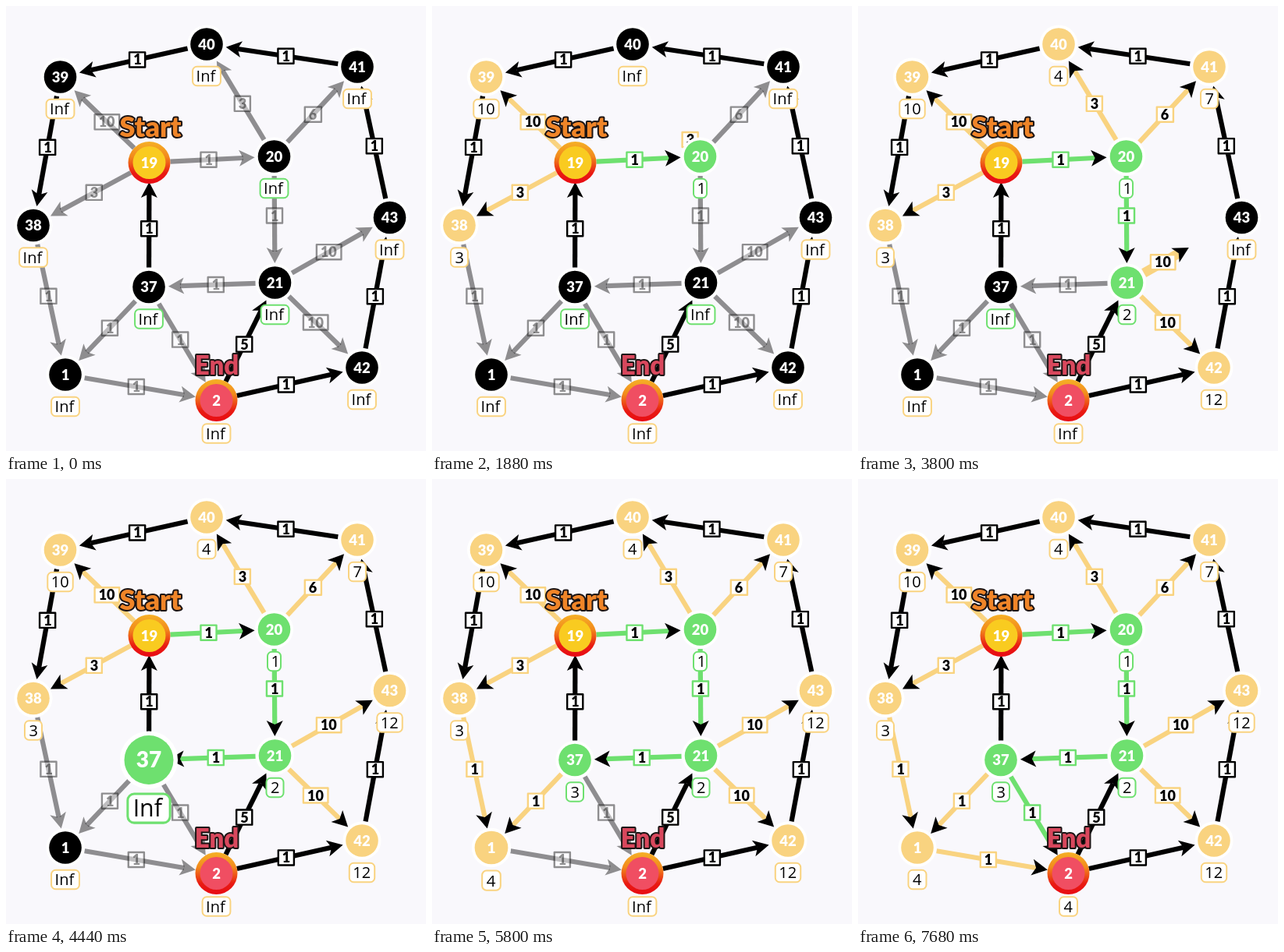
Write an HTML page with a canvas that moves like this. It is 538 by 571 pixels and loops after 7.72 s.

```html
<!DOCTYPE html>
<html lang="en">
<head>
<meta charset="utf-8">
<title>Shortest path</title>
<style>
html, body { margin: 0; width: 100%; height: 100%; overflow: hidden; background: #f9f8fc; }
canvas { display: block; width: 538px; height: 571px; }
</style>
</head>
<body>
<canvas id="stage"></canvas>
<script>
const LOOP = 7720;
const STEP = 420, PAUSE = 195, BEGIN = 225;       // time per edge, wait per visited node, lead-in
const GROW = 215, PEAK = 325, SETTLE = 410;       // phases inside one step
const YELLOW = '#f9d380', GREEN = '#6ee06f', INK = '#000';
const BOLD = 'Lato, "Open Sans", sans-serif', PLAIN = '"Open Sans", "Noto Sans", sans-serif';

const nodes = {
  40: [257, 49], 41: [450, 78], 39: [69.5, 91], 20: [343.5, 193], 19: [183.5, 201], 38: [35, 281.5],
  43: [491.5, 271.5], 37: [183, 360.5], 21: [344.5, 355], 1: [76, 473], 42: [456, 464], 2: [269.5, 506]
};
const path = ['20', '21', '37'];
const fixed = [[40, 39, 1], [41, 40, 1], [43, 41, 1], [39, 38, 1], [37, 19, 1], [2, 21, 5], [2, 42, 1], [42, 43, 1]];

// from, to, weight, resulting distance, on the shortest path
const steps = [
  [19, 38, 3, 3], [19, 39, 10, 10], [19, 20, 1, 1, true],
  [20, 40, 3, 4], [20, 41, 6, 7], [20, 21, 1, 2, true],
  [21, 42, 10, 12], [21, 43, 10, 12], [21, 37, 1, 3, true],
  [38, 1, 1, 4],
  [37, 1, 1, 4], [37, 2, 1, 4, true],
  [1, 2, 1, 4]
];
let clock = BEGIN, last = 0;
const starts = steps.map(([from]) => {
  if (from !== last) clock += PAUSE;
  last = from;
  clock += STEP;
  return clock - STEP;
});

const canvas = document.getElementById('stage');
const ctx = canvas.getContext('2d');
const ratio = window.devicePixelRatio || 1;
canvas.width = 538 * ratio;
canvas.height = 571 * ratio;

const wave = u => (1 - Math.cos(Math.PI * u)) / 2;

function pulse(t) {
  if (t <= GROW || t >= SETTLE) return 1;
  return 1 + (t < PEAK ? wave((t - GROW) / (PEAK - GROW)) : wave((SETTLE - t) / (SETTLE - PEAK)));
}

function disc(r, fill) {
  ctx.beginPath();
  ctx.arc(0, 0, r, 0, 7);
  ctx.fillStyle = fill;
  ctx.fill();
}

// Boxed text, fitted to and centred on the ink of its glyphs
function tag(x, y, text, o) {
  ctx.font = o.font;
  ctx.textAlign = 'left';
  const m = ctx.measureText(text);
  const l = m.actualBoundingBoxLeft, ink = l + m.actualBoundingBoxRight;
  const w = ink + o.pad - o.line, h = o.height - o.line;
  ctx.beginPath();
  ctx.roundRect(x - w / 2, y - h / 2, w, h, o.radius);
  ctx.fillStyle = '#fff';
  ctx.fill();
  ctx.strokeStyle = o.color;
  ctx.lineWidth = o.line;
  ctx.stroke();
  ctx.fillStyle = INK;
  ctx.fillText(text, x - ink / 2 + l, y + o.base);
}

function edge(from, to, weight, color, grown = 1, alpha = 1) {
  const [x, y] = nodes[from], [x2, y2] = nodes[to];
  const dx = x2 - x, dy = y2 - y, dist = Math.hypot(dx, dy);
  const a = from === 19 || from === 2 ? 27 : 25, b = to === 2 ? 27 : 25;
  const tip = a + (dist - a - b) * grown;
  const mid = a + Math.max(0, (tip - a - 10) / 2);
  ctx.save();
  ctx.globalAlpha = alpha;
  ctx.save();
  ctx.translate(x, y);
  ctx.rotate(Math.atan2(dy, dx));
  if (tip - 15 > a) {
    const w = 6.2 * (1 + Math.sin(Math.PI * grown));
    ctx.fillStyle = color;
    ctx.fillRect(a, -w / 2, tip - 15 - a, w);
  }
  ctx.beginPath();
  ctx.moveTo(tip, 0);
  ctx.lineTo(tip - 20, -10.5);
  ctx.lineTo(tip - 15, 0);
  ctx.lineTo(tip - 20, 10.5);
  ctx.closePath();
  ctx.fillStyle = INK;
  ctx.fill();
  ctx.restore();
  tag(x + dx * mid / dist, y + dy * mid / dist, String(weight), {
    font: '900 18px ' + BOLD, pad: 12.5, height: 21.5, line: 2.4, radius: 0, color, base: 6.5
  });
  ctx.restore();
}

function node(id, s) {
  const [x, y] = nodes[id], special = id === '19' || id === '2';
  ctx.save();
  ctx.translate(x, y);
  ctx.scale(s.scale, s.scale);
  if (special) {
    const g = ctx.createLinearGradient(0, -26, 0, 26);
    g.addColorStop(0, '#f5ae26');
    g.addColorStop(0.35, '#f28a1c');
    g.addColorStop(0.75, '#e91b12');
    g.addColorStop(1, '#e80c14');
    disc(27, g);
    disc(21, id === '19' ? '#f9cb20' : '#f04e62');
  } else {
    disc(24.5, '#fff');
    disc(20.8, s.color);
  }
  ctx.font = '900 18.5px ' + BOLD;
  ctx.textAlign = 'center';
  ctx.fillStyle = '#fff';
  ctx.fillText(id, 0, 6.6);
  if (id !== '19') {
    tag(0, id === '2' ? 42.5 : 41, s.text, {
      font: '400 20px ' + PLAIN, pad: 13, height: 26.5, line: 2, radius: 5.5,
      color: path.includes(id) ? GREEN : YELLOW, base: 7.2
    });
  }
  ctx.restore();
}

function title(text, x, y, size, color) {
  ctx.font = `900 ${size}px ${BOLD}`;
  ctx.textAlign = 'center';
  ctx.lineJoin = 'round';
  ctx.lineWidth = 4;
  ctx.strokeStyle = '#1c1414';
  ctx.strokeText(text, x, y);
  ctx.fillStyle = color;
  ctx.fillText(text, x, y);
}

function draw(now) {
  ctx.setTransform(ratio, 0, 0, ratio, 0, 0);
  ctx.fillStyle = '#f9f8fc';
  ctx.fillRect(0, 0, 538, 571);

  const state = {};
  for (const id in nodes) state[id] = { scale: 1, color: INK, text: 'Inf' };

  steps.forEach(([from, to, weight], i) => {
    if (now < starts[i]) edge(from, to, weight, INK, 1, 0.43);
  });
  fixed.forEach(e => edge(...e, INK));
  steps.forEach(([from, to, weight, total, best], i) => {
    const t = now - starts[i];
    if (t < 0) return;
    const color = best ? GREEN : YELLOW, s = state[to];
    edge(from, to, weight, color, 1 - (1 - Math.min(1, t / GROW)) ** 3);
    if (t >= GROW) {
      s.color = path.includes(String(to)) ? GREEN : YELLOW;
      s.scale = pulse(t);
    }
    if (t >= SETTLE) s.text = String(total);
  });

  Object.keys(nodes)
    .sort((p, q) => state[p].scale - state[q].scale)
    .forEach(id => node(id, state[id]));
  title('Start', 185, 167.5, 36, '#f08528');
  title('End', 270, 472.5, 33, '#d9485d');
}

function tick() {
  draw(performance.now() % LOOP);
  requestAnimationFrame(tick);
}
tick();
</script>
</body>
</html>
```
